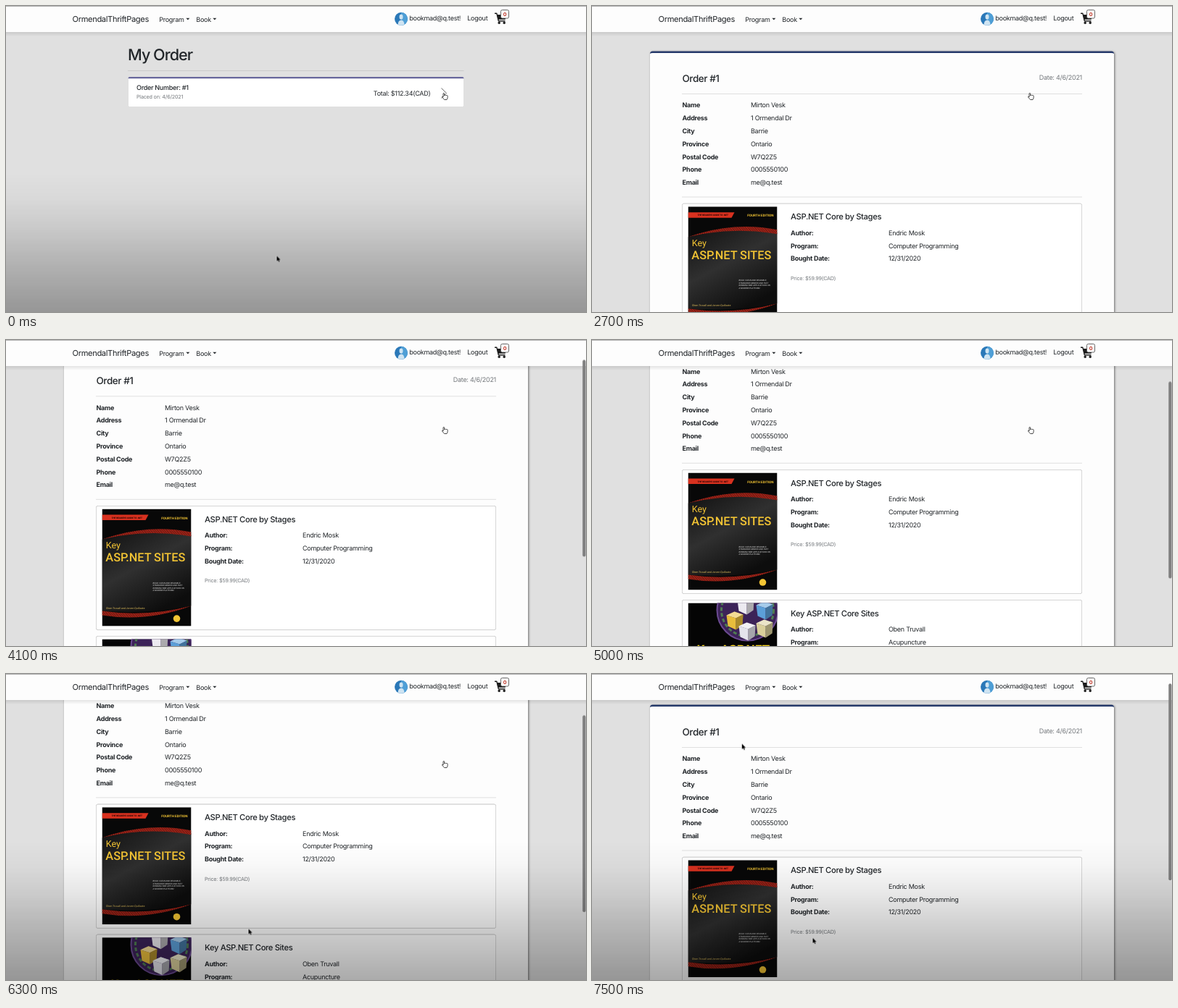
These frames come from a looping animation (800x423 px, 7600 ms). An HTML page:

```html
<!DOCTYPE html>
<html lang="en">
<head>
<meta charset="utf-8">
<title>My Order</title>
<style>
  html, body { margin: 0; width: 100%; height: 100%; overflow: hidden; background: #e0e0e0; }
  svg { display: block; width: 100vw; height: 100vh; }
  text { font: 400 9px Inter, "Open Sans", sans-serif; letter-spacing: -.03em; fill: #212529; text-rendering: geometricPrecision; white-space: pre; }
  .brand { font-size: 11.1px; }
  .h1 { font-size: 21.6px; font-weight: 500; letter-spacing: -.045em; }
  .h4 { font-size: 13.4px; font-weight: 500; }
  .h5 { font-size: 11.2px; font-weight: 500; }
  .medium { font-weight: 500; }
  .bold { font-weight: 700; }
  .muted { fill: #74787c; }
  .small { font-size: 7.2px; }
  .end { text-anchor: end; }
  .hr { stroke: #e0e0e0; }
  .sheet { filter: drop-shadow(1.5px 1.5px 1.5px #0008); }
  .item { fill: #fff; stroke: #dcdcdc; stroke-width: .7; filter: drop-shadow(.8px .8px .6px #0007); }
  .cover text { font-family: Roboto, "Open Sans", sans-serif; letter-spacing: 0; fill: #f4c534; }
  .cover .tiny { font-size: 3.3px; fill: #ddd; }

  /* keyframes are sampled by the clock in --t (ms) */
  .anim { animation: 7.6s linear infinite both paused; animation-delay: calc(var(--t, 0) * -1ms); }
  .list { animation-name: list; animation-timing-function: step-end; }
  .detail { animation-name: detail; animation-timing-function: step-end; }
  .ring { animation-name: ring; }
  .scroll { animation-name: scroll; }
  .thumb { animation-name: thumb; }
  .bar { animation-name: bar; animation-timing-function: step-end; }
  .shade { animation-name: shade; }
  .mouse { animation-name: mouse; }
  .pointer { animation-name: pointer; }
  .hand { animation-name: hand; animation-timing-function: step-end; }
  .tip { animation-name: tip; animation-timing-function: step-end; }

  @keyframes list { 0% { opacity: 1 } 22.36%, 100% { opacity: 0 } }
  @keyframes detail { 0% { opacity: 0 } 22.36%, 100% { opacity: 1 } }
  @keyframes ring { 0%, 6.58% { opacity: 0 } 10.52%, 100% { opacity: 1 } }
  @keyframes scroll {
    0%, 38.16% { transform: translateY(0); animation-timing-function: cubic-bezier(.37, 0, .63, 1) }
    73.68%, 77.95% { transform: translateY(-106px); animation-timing-function: cubic-bezier(.37, 0, .63, 1) }
    97.36%, 100% { transform: translateY(-20px) }
  }
  @keyframes thumb {
    0%, 38.16% { transform: translateY(0); animation-timing-function: cubic-bezier(.37, 0, .63, 1) }
    73.68%, 77.95% { transform: translateY(63.6px); animation-timing-function: cubic-bezier(.37, 0, .63, 1) }
    97.36%, 100% { transform: translateY(12px) }
  }
  @keyframes bar { 0% { opacity: 0 } 38.15%, 100% { opacity: 1 } }
  @keyframes shade { 0%, 13.16% { opacity: 1 } 18.42%, 73.69% { opacity: 0 } 78.94%, 100% { opacity: 1 } }
  @keyframes mouse {
    0%, 50% { transform: translate(373.5px, 345.5px) }
    50.01%, 75% { transform: translate(348px, 347px) }
    82.89% { transform: translate(334.5px, 352.3px) }
    98.68%, 100% { transform: translate(304.5px, 364.8px) }
  }
  @keyframes pointer {
    0%, 90.78% { transform: translate(601px, 120px); animation-timing-function: ease-in-out }
    98.68%, 100% { transform: translate(206.8px, 96.5px) }
  }
  @keyframes hand { 0% { opacity: 1 } 90.78%, 100% { opacity: 0 } }
  @keyframes tip { 0% { opacity: 0 } 90.78%, 100% { opacity: 1 } }
</style>
</head>
<body>
<svg viewBox="0 0 800 423">
  <defs>
    <linearGradient id="fade" x2="0" y2="1">
      <stop offset="0" stop-opacity="0"/>
      <stop offset=".17" stop-opacity=".025"/>
      <stop offset=".36" stop-opacity=".085"/>
      <stop offset=".62" stop-opacity=".19"/>
      <stop offset="1" stop-opacity=".33"/>
    </linearGradient>
    <linearGradient id="drop" x2="0" y2="1">
      <stop offset="0" stop-opacity=".1"/>
      <stop offset="1" stop-opacity="0"/>
    </linearGradient>
    <linearGradient id="slate" x2=".6" y2="1">
      <stop offset="0" stop-color="#111"/>
      <stop offset=".5" stop-color="#303030"/>
      <stop offset="1" stop-color="#0d0d0d"/>
    </linearGradient>
    <pattern id="hatch" width="2" height="2" patternUnits="userSpaceOnUse" patternTransform="rotate(35)">
      <rect width="2" height="2" fill="#1c0806"/>
      <rect width="1.2" height="2" fill="#d32d1f"/>
    </pattern>
    <clipPath id="page"><rect width="123" height="162"/></clipPath>
    <g id="cube">
      <path d="M0-13 12-9 2-4-11-8Z" fill="currentColor"/>
      <path d="M0-13 12-9 2-4-11-8Z" fill="#fff" opacity=".45"/>
      <path d="M-11-8 2-4V12L-9 7Z" fill="currentColor"/>
      <path d="M12-9 2-4V12L11 6Z" fill="currentColor"/>
      <path d="M12-9 2-4V12L11 6Z" opacity=".28"/>
    </g>
    <path id="arrow" d="M0 0V7.4L1.7 5.8 2.9 8.5 4.1 8 2.9 5.4H5.3Z" stroke="#fff" stroke-width=".6" paint-order="stroke"/>
    <path id="caret" d="M0 0H5L2.5 2.6Z" fill="#212529"/>
  </defs>

  <rect width="800" height="423" fill="#e0e0e0"/>

  <g class="anim list">
    <text class="h1" x="168" y="75.3">My Order</text>
    <path d="M168 89.5H631.5" stroke="#cbcbcb"/>
    <rect x="168.5" y="98.5" width="463" height="41" rx="2" fill="#fff" stroke="#d6d6d6" stroke-width=".6"/>
    <path d="M168.5 100.3V100a2 2 0 0 1 2-2H629.5a2 2 0 0 1 2 2V100.3Z" fill="#68679c"/>
    <text class="medium" x="180" y="115.8">Order Number: #1</text>
    <text class="small muted" x="180" y="128.2">Placed on: 4/6/2021</text>
    <text class="end" x="585.5" y="123.7">Total: $112.34(CAD)</text>
    <path d="M600.5 113.5 607.5 120.5 600.5 127.5" fill="none" stroke="#444" stroke-width=".8"/>
    <rect class="anim ring" x="587.5" y="106.8" width="33" height="27" rx="2.5" fill="none" stroke="#b7d9ef" stroke-width="2"/>
  </g>

  <g class="anim detail">
    <g class="anim scroll">
      <g class="sheet">
        <rect x="80" y="63" width="640" height="581" rx="3.5" fill="#fdfdfd"/>
        <path d="M80 66V66a3.5 3.5 0 0 1 3.5-3.5H716.500a3.5 3.5 0 0 1 3.500 3.500Q719 65 716.500 65H83.500Q81 65 80 66Z" fill="#263a6b"/>
      </g>
      <text class="h4" x="124.500" y="104.700">Order #1</text>
      <text class="muted end" x="676" y="101.900">Date: 4/6/2021</text>
      <path class="hr" d="M124 121.500H676M124 264H676"/>
      <text class="bold" y="140.300"><tspan x="124.500">Name</tspan><tspan x="124.500" dy="17.800">Address</tspan><tspan x="124.500" dy="17.800">City</tspan><tspan x="124.500" dy="17.800">Province</tspan><tspan x="124.500" dy="17.800">Postal Code</tspan><tspan x="124.500" dy="17.800">Phone</tspan><tspan x="124.500" dy="17.800">Email</tspan></text>
      <text y="140.300"><tspan x="219">Mirton Vesk</tspan><tspan x="219" dy="17.800">1 Ormendal Dr</tspan><tspan x="219" dy="17.800">Barrie</tspan><tspan x="219" dy="17.800">Ontario</tspan><tspan x="219" dy="17.800">W7Q2Z5</tspan><tspan x="219" dy="17.800">0005550100</tspan><tspan x="219" dy="17.800">me@q.test</tspan></text>

      <g transform="translate(124.500 273.300)">
        <rect class="item" width="551" height="171" rx="2"/>
        <g class="cover" transform="translate(8 4)" clip-path="url(#page)">
          <rect width="123" height="162" fill="#080808"/>
          <path d="M0 42Q60 24 123 36V134Q60 146 0 141Z" fill="url(#slate)"/>
          <path d="M0 42Q62 20 123 32V38Q62 27 0 42Z" fill="url(#hatch)"/>
          <path d="M0 141Q62 150 123 134Q62 157 0 147Z" fill="url(#hatch)"/>
          <path d="M0 8H64L60 15.500H0Z" fill="#d8311f"/>
          <text x="13" y="13" style="font-size:3.200px;font-weight:700;font-style:italic;fill:#1a0000">THE READER'S GUIDE TO .NET</text>
          <text x="118" y="14.200" class="end" style="font-size:4.600px;font-weight:700">FOURTH EDITION</text>
          <text x="5.300" y="54.500" style="font-size:12.500px">Key</text>
          <text x="4.800" y="72.600" style="font-size:16.300px;font-weight:500">ASP.NET SITES</text>
          <text class="tiny" y="103" style="font-style:italic;font-size:2.900px"><tspan x="70">BUILD CLEAN AND READABLE,</tspan><tspan x="70" dy="3.600">STANDARDS MINDED AND FAST</tspan><tspan x="70" dy="3.600">RUNNING WEB APPLICATIONS ON</tspan><tspan x="70" dy="3.600">A MODERN PLATFORM</tspan></text>
          <text class="tiny" x="5.500" y="138" style="fill:#e5c25c;font-size:3.600px">Oben Truvall and Jorven Quillaste</text>
          <circle cx="103" cy="151.500" r="4.800" fill="#f4c534"/>
        </g>
        <text class="h5" x="149.500" y="22.200">ASP.NET Core by Stages</text>
        <text class="bold" y="43.500"><tspan x="149.500">Author:</tspan><tspan x="149.500" dy="17.800">Program:</tspan><tspan x="149.500" dy="17.800">Bought Date:</tspan></text>
        <text y="43.500"><tspan x="284.500">Endric Mosk</tspan><tspan x="284.500" dy="17.800">Computer Programming</tspan><tspan x="284.500" dy="17.800">12/31/2020</tspan></text>
        <text class="small muted" x="149.500" y="105.800">Price: $59.99(CAD)</text>
      </g>

      <g transform="translate(124.500 453.300)">
        <rect class="item" width="551" height="171" rx="2"/>
        <g class="cover" transform="translate(8 4)" clip-path="url(#page)">
          <rect width="123" height="162" fill="#050505"/>
          <circle cx="82" cy="10" r="42" fill="#3c2358" stroke="#6b4a92" stroke-width="2"/>
          <circle cx="82" cy="10" r="36" fill="none" stroke="#4f7d52" stroke-width="3" stroke-dasharray="5 3"/>
          <use href="#cube" x="79" y="4" color="#eceaf0"/>
          <use href="#cube" x="105" y="11" color="#5c9fd8"/>
          <use href="#cube" x="64" y="25" color="#e8bd3c"/>
          <use href="#cube" x="105" y="36" color="#d9cf9a"/>
          <use href="#cube" x="81" y="40" color="#e4e4ec"/>
          <text x="12" y="70.500" style="font-size:17.300px;font-weight:700;fill:#f6d21c">Key ASP.NET</text>
        </g>
        <text class="h5" x="149.500" y="22.200">Key ASP.NET Core Sites</text>
        <text class="bold" y="43.800"><tspan x="149.500">Author:</tspan><tspan x="149.500" dy="17.800">Program:</tspan><tspan x="149.500" dy="17.800">Bought Date:</tspan></text>
        <text y="43.800"><tspan x="284.500">Oben Truvall</tspan><tspan x="284.500" dy="17.800">Acupuncture</tspan><tspan x="284.500" dy="17.800">1/5/2021</tspan></text>
      </g>
    </g>
  </g>

  <g>
    <rect y="36" width="800" height="6" fill="url(#drop)"/>
    <rect width="800" height="36" fill="#fdfdfd"/>
    <rect width="800" height="1" fill="#b4b4b4"/>
    <text class="brand" x="91.500" y="22">OrmendalThriftPages</text>
    <text x="211.300" y="21.500">Program</text>
    <use href="#caret" x="248.300" y="16.700"/>
    <text x="262.300" y="21.500">Book</text>
    <use href="#caret" x="285.300" y="16.700"/>
    <circle cx="545" cy="17.800" r="9" fill="#2a78b8"/>
    <path d="M545 8.800a9 9 0 0 1 0 18Z" fill="#4f9fd6"/>
    <path d="M540.500 25.500Q541 19.500 545 19.500T549.500 25.500Q545 28 540.500 25.500Z" fill="#cfe4f2"/>
    <ellipse cx="545" cy="15" rx="2.500" ry="3.600" fill="#cfe4f2"/>
    <text x="556.300" y="20.300">bookmad@q.test!</text>
    <text x="636.300" y="20">Logout</text>
    <path d="M674 10.300H676.900L679.300 20.700H688.500" fill="none" stroke="#1c1c1c" stroke-width="1.400" stroke-linejoin="round"/>
    <path d="M677 12H690.300L688.600 18.800H678.600Z" fill="#1c1c1c"/>
    <circle cx="680.200" cy="23.300" r="1.700" fill="#1c1c1c"/>
    <circle cx="687.200" cy="23.300" r="1.700" fill="#1c1c1c"/>
    <rect x="682.500" y="5.500" width="11" height="11.500" rx="2" fill="#fff" stroke="#555" stroke-width=".9"/>
    <text x="688" y="13.900" style="font-size:7px;font-weight:700;fill:#c0392b;text-anchor:middle;letter-spacing:0">0</text>
  </g>

  <g class="anim bar">
    <rect class="anim thumb" x="795.300" y="1.300" width="4.200" height="272" rx="2.100" fill="#7f7f7f"/>
  </g>

  <g class="anim pointer">
    <path class="anim hand" d="M2 6V1.200a.8.8 0 0 1 1.600 0V4l.2-.5a.8.8 0 0 1 1.500.2.8.8 0 0 1 1.500.3.7.7 0 0 1 1.300.5V7L7 9.500H3.600L.6 6a.7.7 0 0 1 1-.9Z" fill="#fff" stroke="#222" stroke-width=".8" stroke-linejoin="round"/>
    <use class="anim tip" href="#arrow"/>
  </g>

  <g class="anim shade">
    <rect y="230" width="800" height="193" fill="url(#fade)"/>
    <g class="anim mouse"><use href="#arrow"/></g>
  </g>
</svg>
<script>
  const LOOP = 7600, STEP = 100;
  const start = performance.now();
  function tick() {
    const t = (performance.now() - start) % LOOP;
    document.documentElement.style.setProperty('--t', Math.floor(t / STEP) * STEP);
    requestAnimationFrame(tick);
  }
  tick();
</script>
</body>
</html>
```
